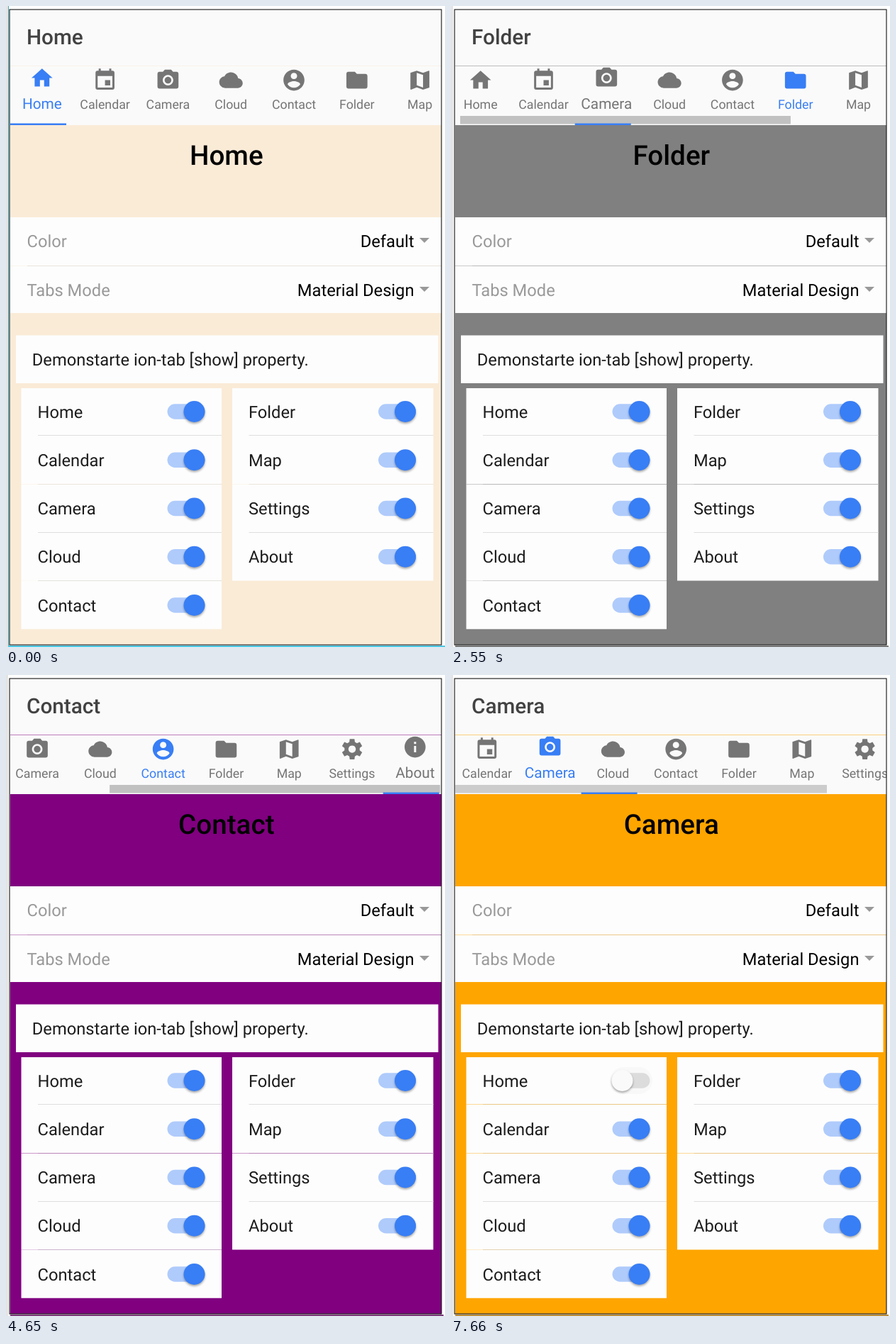
Animation of 619x904 px, one loop 8 s. Source, as an HTML page:

```html
<!DOCTYPE html>
<html lang="en">
<head>
<meta charset="utf-8">
<title>Tabs demo</title>
<style>
html, body { margin: 0; height: 100%; overflow: hidden; background: #fff; }
svg { display: block; }
text { font: 23.7px Roboto, sans-serif; fill: #1c1c1c; text-rendering: geometricPrecision; white-space: pre; }
.mid { text-anchor: middle; }
.end { text-anchor: end; }
.tab { fill: #757575; }
.tab text { font-size: 17.8px; fill: inherit; }
.tab path { fill-rule: evenodd; }
.tab.on { fill: #387ef5; }
.knob { filter: drop-shadow(0 2px 1.5px #0005); }
</style>
</head>
<body>
<svg id="stage" width="619" height="904"></svg>
<script>
const DISC = 'M12 2C6.48 2 2 6.48 2 12s4.48 10 10 10 10-4.48 10-10S17.52 2 12 2z';
const polar = (r, deg) => {
  const a = deg * Math.PI / 180;
  return `${(12 + r * Math.sin(a)).toFixed(2)} ${(12 - r * Math.cos(a)).toFixed(2)}`;
};
const gear = 'M' + [0, 60, 120, 180, 240, 300].map(a =>
  [polar(7.3, a - 21), polar(10, a - 13), polar(10, a + 13), polar(7.3, a + 21)].join('L')
).join('L') + 'zM12 8.5a3.5 3.5 0 1 0 .01 0z';

const TABS = [
  ['Home', 'M10 20v-6h4v6h5v-8h3L12 3 2 12h3v8z'],
  ['Calendar', 'M17 12h-5v5h5zM16 1v2H8V1H6v2H5a2 2 0 0 0-2 2v14a2 2 0 0 0 2 2h14a2 2 0 0 0 2-2V5a2 2 0 0 0-2-2h-1V1zm3 18H5V8h14z'],
  ['Camera', 'M9 2L7.17 4H4a2 2 0 0 0-2 2v12a2 2 0 0 0 2 2h16a2 2 0 0 0 2-2V6a2 2 0 0 0-2-2h-3.17L15 2zM12 7a5 5 0 1 0 .01 0zM12 8.8a3.2 3.2 0 1 0 .01 0z'],
  ['Cloud', 'M19.35 10.04C18.67 6.59 15.64 4 12 4 9.11 4 6.6 5.64 5.35 8.04 2.34 8.36 0 10.91 0 14c0 3.31 2.69 6 6 6h13c2.76 0 5-2.24 5-5 0-2.64-2.05-4.78-4.65-4.96z', 'translate(.84 .84) scale(.93)'],
  ['Contact', DISC + 'M12 5a3 3 0 1 0 .01 0zM12 19.2c-2.5 0-4.71-1.28-6-3.22.03-1.99 4-3.08 6-3.08 1.99 0 5.97 1.09 6 3.08-1.29 1.94-3.5 3.22-6 3.22z'],
  ['Folder', 'M10 4H4a2 2 0 0 0-2 2v12a2 2 0 0 0 2 2h16a2 2 0 0 0 2-2V8a2 2 0 0 0-2-2h-8z'],
  ['Map', 'M20.5 3L15 5.1 9 3 3.36 4.9Q3 5 3 5.38V20.5q0 .5.5.5L9 18.9l6 2.1 5.64-1.9q.36-.1.36-.48V3.5q0-.5-.5-.5zM15 19l-6-2.11V5l6 2.11z'],
  ['Settings', gear],
  ['About', DISC + 'M13 17h-2v-6h2zM13 9h-2V7h2z']
];
const COLORS = { 0: '#faebd7', 2: '#ffa500', 4: '#800080', 5: '#808080', 8: '#e600e6' };
const PITCH = 88.8, ROW = 68.25;

// [time, selected tab, scroll offset]
const PICKS = [[0, 0, 0], [1635, 2, 0], [2545, 5, 185], [3455, 8, 189], [4645, 4, 95], [5485, 2, 0]];
// [time, value], held until the next entry
const BAR = [[0, 0], [2545, 1], [3320, .6], [3455, 1], [4090, .2], [4645, 1], [5350, .63],
  [5485, 1], [6120, .6], [6190, .25], [6330, 0], [7450, .8]];
const SWITCH = [[0, 0], [6330, .08], [6400, .33], [7380, .6], [7450, .9], [7520, 1]];
const HIDE_HOME = 7450;

const rect = (x, y, w, h, fill, more = '') =>
  `<rect x="${x}" y="${y}" width="${w}" height="${h}" fill="${fill}" ${more}/>`;
const text = (x, y, s, more = '') => `<text x="${x}" y="${y}" ${more}>${s}</text>`;
const seam = (x, y, w, o, more = '') => rect(x, y, w, 1, '', `class="tint" opacity="${o}" ${more}`);

function toggle(x, y, id = '') {
  return rect(x - 38, y - 10.7, 53, 21.4, '#afcbfb', `rx="10.7" id="track${id}"`) +
    `<circle class="knob" id="knob${id}" cx="${x}" cy="${y}" r="15" fill="#387ef5"/>`;
}

function card(x, w, names) {
  let out = rect(x, 539, w, names.length * ROW - 1.5, '#fdfdfd');
  names.forEach((name, i) => {
    const y = 572 + i * ROW, first = name === 'Home';
    if (i) out += rect(x + 23.5, Math.round(y - 35), w - 23.5, 1, '#dedede');
    if (first) out += rect(224, 553, 60, 38, '#000', 'rx="19" id="halo"');
    out += text(x + 23, y + 8.5, name) + toggle(x + 244, y, first ? 'Home' : '');
  });
  return out + seam(x, 674, w, .4);
}

const select = (y, label, value) =>
  text(29.5, y + 8.5, label, 'style="fill:#999"') +
  text(575.5, y + 8.5, value, 'class="end" style="fill:#000"') +
  `<path d="M583 ${y - 4}h14l-7 7z" fill="#999"/>`;

const tab = ([name, d, fit = '']) => `<g class="tab">
  <g class="icon"><path d="${d}" transform="${fit}"/></g>
  <g class="label">${text(0, 0, name, 'class="mid"')}</g></g>`;

const $ = id => document.getElementById(id);
const names = TABS.map(t => t[0]);

$('stage').innerHTML =
  rect(0, 0, 3, 904, '#e4e4e4') +
  rect(3, 0, 1, 902, '#4aa9b8', 'class="focus"') +
  rect(6, 902, 611, 2, '', 'class="tint"') + rect(6, 902, 611, 2, '#777', 'opacity=".5"') +
  rect(3, 902, 616, 2, '#4cc8e4', 'class="focus"') +
  rect(6, 6, 608, 162, '#fafafa') +
  rect(6, 168, 608, 733, '', 'class="tint"') +
  text(29, 53.5, '', 'id="title" style="font-size:29.7px;font-weight:500;fill:#424242"') +
  seam(6, 84, 608, .5) +
  `<svg x="6" y="85" width="608" height="83" viewBox="6 85 608 83">
    ${rect(6, 155, 466, 11.5, '#c1c1c1', 'id="bar"')}
    ${TABS.map(tab).join('')}
    ${rect(6, 165.5, 79, 2.5, '#387ef5', 'id="mark"')}
  </svg>` +
  text(310.8, 223.5, '', 'id="head" class="mid" style="font-size:38.6px;font-weight:500;fill:#000"') +
  rect(6, 298, 608, 135, '#fdfdfd') +
  rect(30, 366, 584, 1, '#dedede') + seam(6, 366, 608, .4) +
  select(331, 'Color', 'Default') + select(400, 'Tabs Mode', 'Material Design') +
  rect(14, 464.5, 595.5, 67.5, '#fdfdfd') +
  text(36.8, 507, 'Demonstarte ion-tab [show] property.') +
  card(21.5, 282.5, names.slice(0, 5)) + card(319, 283.5, names.slice(5)) +
  seam(21.5, 810, 282.5, .2) + seam(21.5, 605, 282.5, .4, 'id="offSeam"') +
  '<rect x="5" y="5" width="609" height="896" fill="none" stroke="#111" stroke-width="1.1"/>';

const tabs = [...document.querySelectorAll('.tab')];
const tints = document.querySelectorAll('.tint');
const focus = document.querySelectorAll('.focus');

const clamp = x => Math.min(1, Math.max(0, x));
const smooth = x => x * x * (3 - 2 * x);
const lerp = (a, b, k) => a + (b - a) * k;
const mix = (a, b, k) => `rgb(${a.map((v, i) => Math.round(lerp(v, b[i], k)))})`;
const held = (list, t) => list.findLast(e => e[0] <= t);
const set = (el, attrs) => { for (const k in attrs) el.setAttribute(k, attrs[k]); };
const write = (el, s) => { if (el.textContent !== s) el.textContent = s; };

function draw(t) {
  const pick = held(PICKS, t);
  const [start, now, to] = pick;
  const [, old, from] = PICKS[Math.max(0, PICKS.indexOf(pick) - 1)];
  const age = start ? t - start : 1e4;
  const grow = smooth(clamp(age / 200));
  const scroll = lerp(from, to, 1 - (1 - clamp(age / 300)) ** 3);
  const hidden = t >= HIDE_HOME;

  tints.forEach(el => set(el, { fill: COLORS[now] }));
  focus.forEach(el => set(el, { visibility: t < 100 ? 'visible' : 'hidden' }));
  write($('title'), names[now]);
  write($('head'), names[now]);

  tabs.forEach((el, i) => {
    const k = i === now ? grow : i === old ? 1 - grow : 0;
    const x = 50.8 + PITCH * (i - hidden) - scroll;
    el.classList.toggle('on', i === now);
    set(el, { visibility: hidden && !i ? 'hidden' : 'visible' });
    set(el.children[0], { transform: `translate(${x - 17.8} ${86.8 - 3 * k}) scale(1.483)` });
    set(el.children[1], { transform: `translate(${x} 145.3) scale(${1 + k / 6})` });
  });
  set($('mark'), { x: 6 + PITCH * lerp(old, now, smooth(clamp(age / 300))) - scroll });
  set($('bar'), { x: 6 + scroll * .76, width: hidden ? 524 : 466, opacity: held(BAR, t)[1] });

  const off = held(SWITCH, t)[1];
  set($('knobHome'), { cx: 265.5 - 24 * off, fill: mix([56, 126, 245], [250, 250, 250], off) });
  set($('trackHome'), { fill: mix([175, 203, 251], [220, 220, 220], off) });
  set($('halo'), { opacity: off ? .02 : 0 });
  set($('offSeam'), { visibility: hidden ? 'visible' : 'hidden' });
}

const born = performance.now();
function frame() {
  const t = (performance.now() - born) % 8000;
  draw(t < 100 ? 0 : t - (t - 100) % 70);
  requestAnimationFrame(frame);
}
frame();
</script>
</body>
</html>
```
